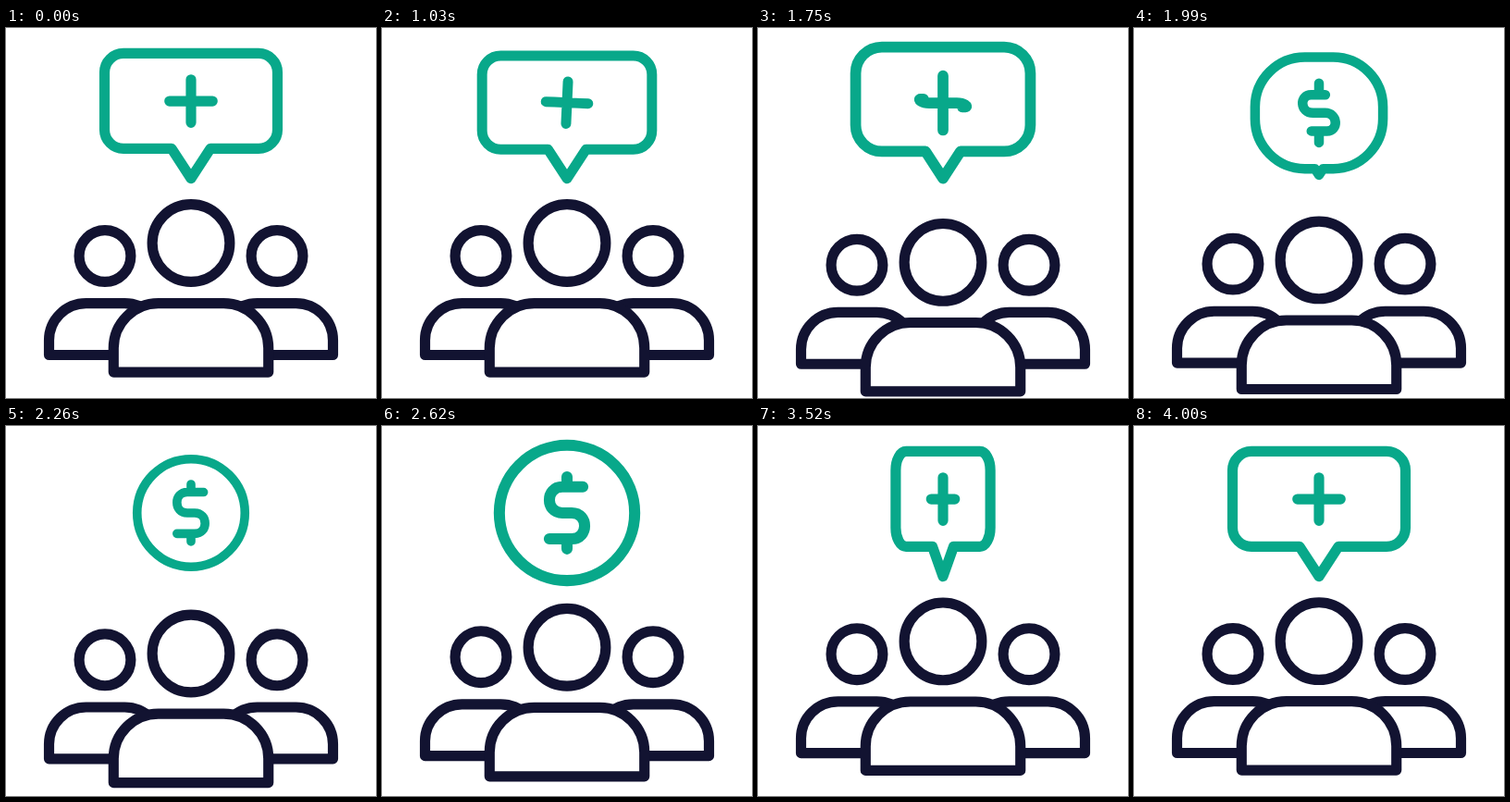
These frames come from a looping animation (400x400 px, 4030 ms). An HTML page:

```html
<!DOCTYPE html>
<html lang="en">
<head>
<meta charset="utf-8">
<title>Group support</title>
<style>
  html, body { margin: 0; width: 100%; height: 100%; overflow: hidden; background: #fff; }
  svg { display: block; width: 100vw; height: 100vh; }
  path, circle { fill: none; stroke-width: 12; stroke-linecap: round; stroke-linejoin: round; }
  .people { stroke: #121331; }
  .people path { fill: #fff; }
  .message { stroke: #08a88a; }
</style>
</head>
<body>
<svg viewBox="0 0 430 430">
  <g class="people">
    <g id="sides">
      <g id="member">
        <circle cx="115" cy="265" r="30"/>
        <path d="M50 380V363a43 43 0 0 1 43-43h45a43 43 0 0 1 43 43V380z"/>
      </g>
      <use href="#member" transform="translate(430) scale(-1 1)"/>
    </g>
    <g id="leader">
      <circle cx="215" cy="250" r="45"/>
      <path d="M125 400V372a52 52 0 0 1 52-52h76a52 52 0 0 1 52 52V400z"/>
    </g>
  </g>
  <g class="message" id="message">
    <path id="outline"/>
    <path id="symbol"/>
  </g>
</svg>
<script>
const LOOP = 4030, FLIP = 3300, MIDDLE = 215;
const $ = id => document.getElementById(id);
const clamp = v => Math.min(1, Math.max(0, v));
const mix = (a, b, k) => a + (b - a) * k;
const smooth = k => k * k * (3 - 2 * k);
const ease = (t, from, to) => smooth(clamp((t - from) / (to - from)));

// Squash and stretch: each pulse eases on from the one before
const pulses = [[990, 1], [1200, .82], [1640, 1.068], [2250, .86], [2700, 1.1], [FLIP, 1]];
const scale = t => pulses.slice(1).reduce(
  (s, [end, size], i) => s + (size - pulses[i][1]) * ease(t, pulses[i][0], end), 1);

// The group ducks quickly and rises slowly
const duck = t => ease(t, 1060, 1600) * Math.exp(-(((t - 1660) / 900) ** 2));

const spin = t => t < FLIP
  ? Math.cos(Math.PI / 2 * clamp((t - 2860) / (FLIP - 2860)))
  : Math.sin(Math.PI / 2 * clamp((t - FLIP) / 600));

// Rounded box with a tail; at m = 1 the box is a circle and the tail is gone
function outlinePath(m, s, width) {
  const half = mix(100.5, 72.8, m), radius = mix(22, 72.8, m);
  const top = mix(29.5, 28.2, m), bottom = mix(140.2, 173.8, m);
  const tail = mix(22.5, 0, m), tip = bottom + mix(34.6, 0, m);
  const anchor = mix(185, 101, m);
  const at = (x, y) => `${MIDDLE + x * s * width} ${anchor + (y - anchor) * s}`;
  const arc = `A${radius * s * width} ${radius * s} 0 0 0 `;
  const inner = half - radius;
  return `M${at(0, tip)}L${at(tail, bottom)}L${at(inner, bottom)}`
    + arc + at(half, bottom - radius) + "L" + at(half, top + radius)
    + arc + at(inner, top) + "L" + at(-inner, top)
    + arc + at(-half, top + radius) + "L" + at(-half, bottom - radius)
    + arc + at(-inner, bottom) + `L${at(-tail, bottom)}Z`;
}

// The bar of the plus bends into an S while the stem opens in the middle
function symbolPath(m, size, width, cy, angle) {
  const cos = Math.cos(angle), sin = Math.sin(angle);
  const at = (x, y) =>
    `${MIDDLE + (x * cos - y * sin) * size * width} ${cy + (x * sin + y * cos) * size} `;
  const bend = (x, toX, toY) => at(mix(x, toX, m), toY * m);
  const stem = side => "M" + at(0, side * mix(25, 38.7, m)) + "L" + at(0, side * 28 * m);
  return "M" + bend(-25, 17, -28) + "L" + bend(-25, -5, -28)
    + "C" + bend(-25, -23.6, -28) + bend(-21, -23.6, 0) + bend(-15, -5, 0)
    + "L" + bend(15, 5, 0)
    + "C" + bend(21, 23.6, 0) + bend(25, 23.6, 28) + bend(25, 5, 28)
    + "L" + bend(25, -19, 28) + stem(-1) + stem(1);
}

function draw(t) {
  const m = t < FLIP ? ease(t, 1630, 2150) : 0;
  const s = scale(t), width = spin(t), down = duck(t);
  const size = s * (1 + .14 * down * (1 - m));
  const cy = mix(85, 101, m) + 100 * Math.max(0, 1 - s) * (1 - m);
  const angle = Math.PI * ease(t, 990, 1560);

  $("outline").setAttribute("d", outlinePath(m, s, width));
  $("symbol").setAttribute("d", symbolPath(m, size, width, cy, angle % Math.PI));
  for (const id of ["outline", "symbol"]) $(id).style.strokeWidth = 12 * s;
  $("leader").setAttribute("transform", `translate(0 ${22.6 * down})`);
  $("sides").setAttribute("transform", `translate(0 ${10.6 * down})`);
}

function tick() {
  draw(performance.now() % LOOP);
  requestAnimationFrame(tick);
}
tick();
</script>
</body>
</html>
```
